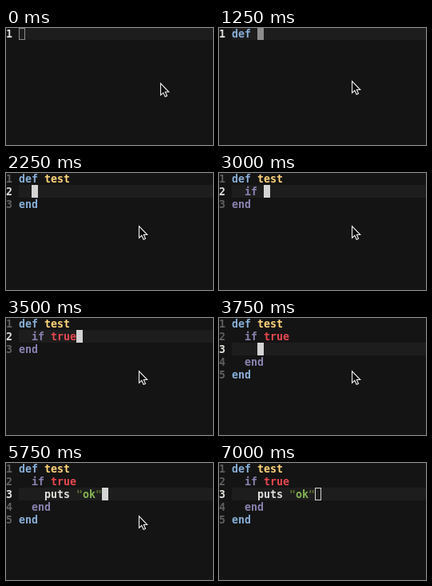
Animation, 259 px wide and 147 px high, one loop 7500 ms. Source, as an HTML page with a canvas:

```html
<!DOCTYPE html>
<html lang="en">
<head>
<meta charset="utf-8">
<title>Typing a method</title>
<style>
html, body { margin: 0; width: 100%; height: 100%; overflow: hidden; background: #141414; }
canvas { display: block; width: 259px; height: 147px; }
</style>
</head>
<body>
<canvas></canvas>
<script>
const W = 259, H = 147, LOOP = 7500, CELL = 8, ROW = 16, LEFT = 16, BASELINE = 12;
const BLUE = '#87afd7', PURPLE = '#8a83b0', YELLOW = '#ffd47c', RED = '#e6484f',
      GREEN = '#84b653', QUOTE = '#5f7332', WHITE = '#e0e0dc', GREY = '#5f5f5f';

const canvas = document.querySelector('canvas');
const ctx = canvas.getContext('2d');
const scale = devicePixelRatio || 1;
canvas.width = W * scale;
canvas.height = H * scale;
ctx.scale(scale, scale);

// Buffer contents over time; | marks the caret
const outer = s => `def test\n  ${s}\nend`;
const inner = s => outer(`if true\n    ${s}\n  end`);
const steps = [
  [0, '|'],
  [1000, 'de|'],
  [1250, 'def |'],
  [1500, 'def t|'],
  [1750, 'def tes|'],
  [2000, 'def test|'],
  [2250, outer('|')],
  [2750, outer('if|')],
  [3000, outer('if |')],
  [3250, outer('if tru|')],
  [3500, outer('if true|')],
  [3750, inner('|')],
  [4250, inner('p|')],
  [4500, inner('pu|')],
  [4750, inner('put|')],
  [5000, inner('puts |')],
  [5250, inner('puts "ok|')],
  [5750, inner('puts "ok"|')]
];

// Splits into [word, colour]; each end takes the colour of its opener
function highlight(text) {
  const blocks = [];
  let inString = false, last = '';
  return text.match(/\w+|\s|"/g)?.map(word => {
    let color = WHITE;
    if (word === '"') {
      inString = !inString;
      color = QUOTE;
    } else if (inString) color = GREEN;
    else if (word === 'def') blocks.push(color = BLUE);
    else if (word === 'if') blocks.push(color = PURPLE);
    else if (word === 'end') color = blocks.pop();
    else if (word === 'true') color = RED;
    else if (last === 'def') color = YELLOW;
    if (word.trim()) last = word;
    return [word, color];
  }) || [];
}

function glyph(ch, x, row, color) {
  ctx.fillStyle = color;
  ctx.fillText(ch, x, BASELINE + row * ROW);
}

function drawCaret(t, x, y, h) {
  if (t < 500 || t >= 6750) {
    ctx.strokeStyle = t < 500 ? '#8c8c8c' : t < 7000 ? '#777' : '#d4d4d4';
    ctx.lineWidth = 1;
    ctx.strokeRect(x + .5, y + .5, CELL - 1, h - 1);
  } else {
    ctx.fillStyle = t < 2250 ? '#8c8c8c' : '#d4d4d4';
    ctx.fillRect(x, y, CELL, h);
  }
}

function drawPointer(x, y) {
  ctx.save();
  ctx.translate(x, y);
  const arrow = new Path2D('M0 0V14.6L3.3 11.6L5.6 16.6L8 15.5L5.8 10.6H10.2Z');
  ctx.fillStyle = '#080808';
  ctx.strokeStyle = '#f0f0f0';
  ctx.lineWidth = 1.1;
  ctx.fill(arrow);
  ctx.stroke(arrow);
  ctx.restore();
}

function draw(t) {
  const marked = steps.findLast(s => s[0] <= t)[1];
  const before = marked.split('|')[0].split('\n');
  const current = before.length - 1;
  const y = current ? current * ROW - 1 : 0;
  const h = current ? ROW : ROW - 1;

  ctx.fillStyle = '#141414';
  ctx.fillRect(0, 0, W, H);
  ctx.fillStyle = '#1d1d1d';
  ctx.fillRect(LEFT, y, W - LEFT, h);

  ctx.font = 'bold 13.29px "DejaVu Sans Mono", monospace';
  const text = marked.replace('|', '');
  text.split('\n').forEach((_, row) =>
    glyph(row + 1, 0, row, row === current ? WHITE : GREY));

  let row = 0, col = 0;
  for (const [word, color] of highlight(text)) {
    for (const ch of word) {
      if (ch === '\n') {
        row++;
        col = 0;
      } else glyph(ch, LEFT + CELL * col++, row, color);
    }
  }

  drawCaret(t, LEFT + CELL * before[current].length, y, h);
  if (t < 250) drawPointer(193.5, 69.7);
  else if (t < 6000) drawPointer(166.5, 66.9);
}

const start = performance.now();
function tick(now) {
  draw(Math.max(0, now - start) % LOOP);
  requestAnimationFrame(tick);
}
draw(0);
requestAnimationFrame(tick);
</script>
</body>
</html>
```
